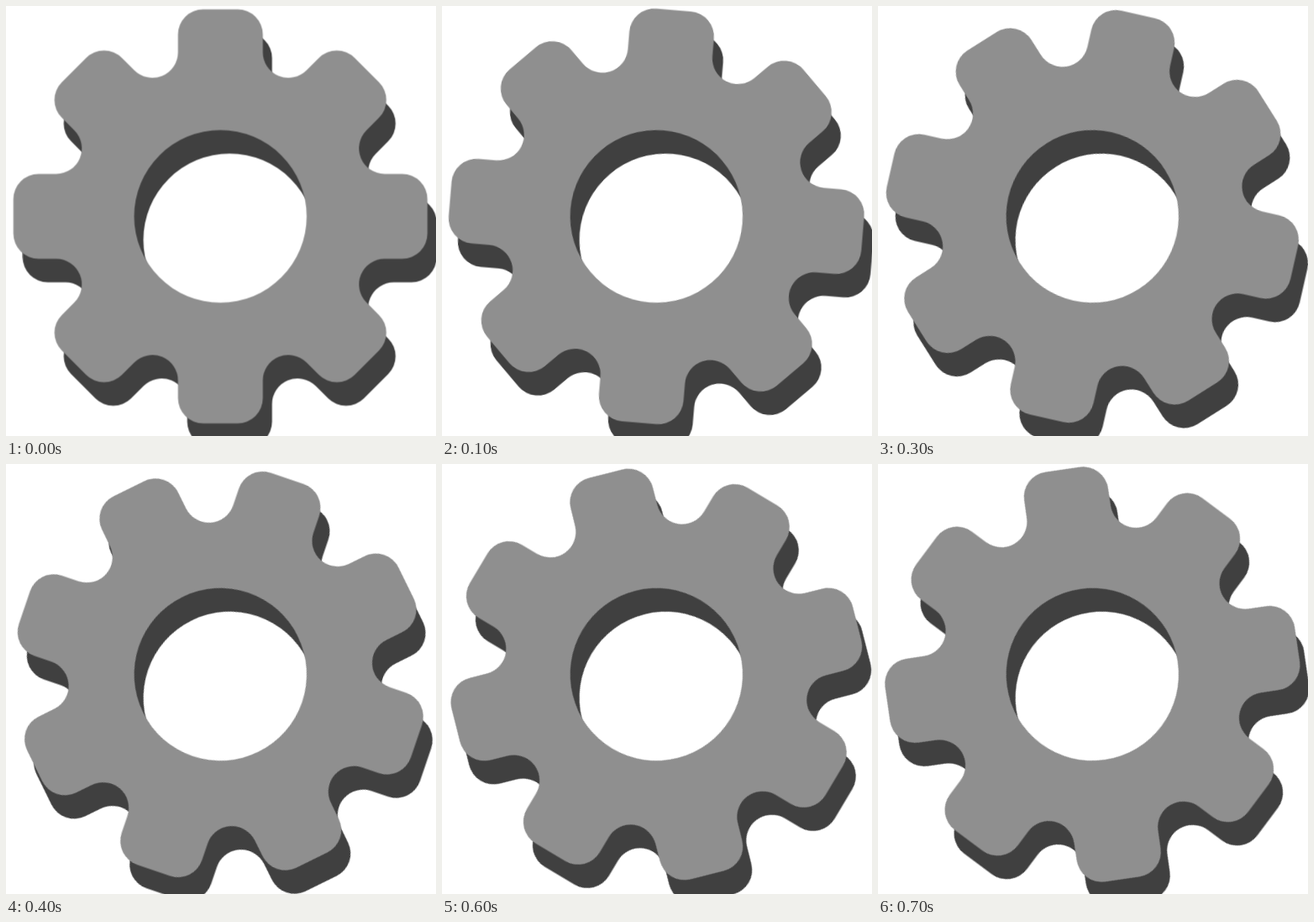
Write an HTML page that moves like this. It is 512x512 px and loops after 0.8 s.

```html
<!DOCTYPE html>
<html lang="en">
<head>
<meta charset="utf-8">
<title>Turning gear</title>
<style>
  html, body { margin: 0; width: 100%; height: 100%; overflow: hidden; background: #fff; }
  svg { display: block; width: 100vw; height: 100vh; }
  .gear { fill-rule: evenodd; transform-origin: 0 0; animation: turn 800ms step-end infinite; }
  .front { fill: #8f8f8f; }
  .shade { fill: #404040; }
  /* one tooth pitch per loop, in held poses */
  @keyframes turn {
    0%    { transform: rotate(0deg); }
    12.5% { transform: rotate(4.8deg); }
    25%   { transform: rotate(8.8deg); }
    37.5% { transform: rotate(12.8deg); }
    50%   { transform: rotate(18.8deg); }
    62.5% { transform: rotate(24.8deg); }
    75%   { transform: rotate(30.8deg); }
    87.5% { transform: rotate(36.7deg); }
    100%  { transform: rotate(45deg); }
  }
</style>
</head>
<body>
<svg viewBox="0 0 512 512">
  <g transform="translate(266.3 278.5)"><path class="gear shade"/></g>
  <g transform="translate(255.3 250.5)"><path class="gear front"/></g>
</svg>
<script>
  const teeth = 8, outer = 246.5, half = 50.5, corner = 30, fillet = 30.5, hole = 102.7;
  const pitch = 2 * Math.PI / teeth;
  const root = (half + fillet) / Math.tan(pitch / 2);

  // point in the frame of tooth k, y measured outwards
  function at(k, x, y) {
    const a = k * pitch, c = Math.cos(a), s = Math.sin(a);
    return (x * c + y * s).toFixed(2) + ' ' + (x * s - y * c).toFixed(2);
  }
  const arc = (r, sweep, p) => `A${r} ${r} 0 0 ${sweep} ${p}`;

  let d = 'M' + at(0, -half, root);
  for (let k = 0; k < teeth; k++) {
    d += 'L' + at(k, -half, outer - corner)
      + arc(corner, 1, at(k, corner - half, outer))
      + 'L' + at(k, half - corner, outer)
      + arc(corner, 1, at(k, half, outer - corner))
      + 'L' + at(k, half, root)
      + arc(fillet, 0, at(k + 1, -half, root));
  }
  d += `ZM${hole} 0` + arc(hole, 1, `${-hole} 0`) + arc(hole, 1, `${hole} 0`) + 'Z';
  document.querySelectorAll('.gear').forEach(p => p.setAttribute('d', d));
</script>
</body>
</html>
```
